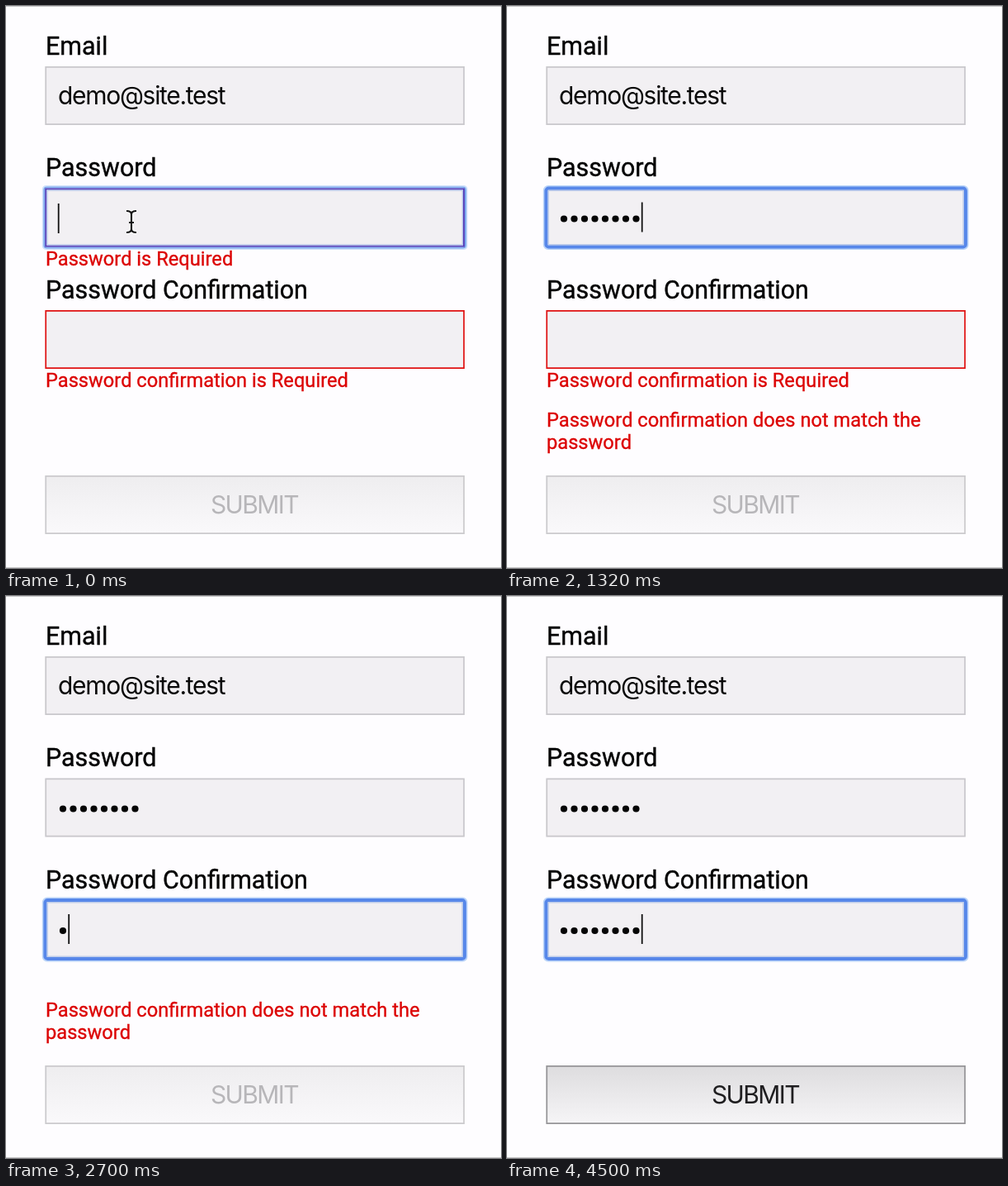
An HTML page with a canvas for the animation above (4.68 s loop, 600 by 680 pixels).

```html
<!DOCTYPE html>
<html lang="en">
<head>
<meta charset="utf-8">
<title>Password form</title>
<style>
html, body { margin: 0; width: 100%; height: 100%; overflow: hidden; background: #fefdff; }
canvas { display: block; }
</style>
</head>
<body>
<canvas id="stage" width="600" height="680"></canvas>
<script>
const ctx = document.getElementById('stage').getContext('2d');
const LOOP = 4680;
const BLINK = 270;
const TEXT_X = 48;
const LEFT = 47.4, WIDTH = 508.5, HEIGHT = 71;
const LABEL = '30.45px Roboto, sans-serif';
const ERROR = '23.67px Roboto, sans-serif';
const CONTROL = '30px Inter, sans-serif';

// Timed input: first field, tab to the second, one extra key, then backspace.
const FOCUS_CONFIRM = 1920;
const passwordKeys = Array.from({ length: 8 }, (_, i) => 540 + i * 100);
const confirmKeys = Array.from({ length: 7 }, (_, i) => 2640 + i * 90).concat(3600, 3720);
const BACKSPACE = 4260;
const carets = [-30, ...passwordKeys, FOCUS_CONFIRM, ...confirmKeys, BACKSPACE];

const countBefore = (times, t) => times.filter(k => k <= t).length;

function text(str, x, y, font, color, { spacing = 0, align = 'left', bolder = 0 } = {}) {
  ctx.font = font;
  ctx.fillStyle = ctx.strokeStyle = color;
  ctx.textAlign = align;
  ctx.letterSpacing = spacing + 'px';
  ctx.fillText(str, x, y);
  if (bolder) {
    ctx.lineWidth = bolder;
    ctx.strokeText(str, x, y);
  }
}

const label = (str, y) => text(str, TEXT_X, y, LABEL, '#040404', { bolder: 0.4 });
const error = (str, y) => text(str, TEXT_X, y, ERROR, '#dc0404', { bolder: 0.35 });

function frameField(y, color, width, inset, radius = 0) {
  ctx.strokeStyle = color;
  ctx.lineWidth = width;
  ctx.beginPath();
  ctx.roundRect(LEFT + inset, y + inset, WIDTH - 2 * inset, HEIGHT - 2 * inset, radius);
  ctx.stroke();
}

function field(y, { focused = false, invalid = false } = {}) {
  ctx.fillStyle = '#f2f0f3';
  ctx.fillRect(LEFT, y, WIDTH, HEIGHT);
  if (!focused) {
    frameField(y, invalid ? '#e01212' : '#c9c8cc', 1.7, 0.85);
  } else if (invalid) {
    frameField(y, '#cfe1fb', 1.8, -2.7, 4);
    frameField(y, '#7da9ee', 2.2, -1, 3);
    frameField(y, '#5640ba', 2, 0.9);
    frameField(y, '#bac8ea', 1.4, 2.5);
  } else {
    frameField(y, '#b9d3f8', 2.2, -2.5, 5);
    frameField(y, '#5787e9', 4.2, 0.1, 3);
    frameField(y, '#bccbea', 1.4, 2.8);
  }
}

function dots(count, y) {
  ctx.fillStyle = '#050505';
  for (let i = 0; i < count; i++) {
    ctx.beginPath();
    ctx.arc(69 + i * 12.5, y, 4.1, 0, Math.PI * 2);
    ctx.fill();
  }
}

function caret(count, y) {
  ctx.fillStyle = '#111';
  ctx.fillRect(62.8 + count * 12.5, y, 1.8, 36);
}

function pointer(x, y) {
  const beam = new Path2D();
  for (const s of [-1, 1]) {
    beam.moveTo(x - 6, y + s * 13);
    beam.quadraticCurveTo(x, y + s * 13, x, y + s * 9);
    beam.quadraticCurveTo(x, y + s * 13, x + 6, y + s * 13);
  }
  beam.moveTo(x, y - 10);
  beam.lineTo(x, y + 10);
  beam.moveTo(x - 3, y + 1);
  beam.lineTo(x + 3, y + 1);
  for (const [color, width] of [['#fff', 4.5], ['#151515', 2.2]]) {
    ctx.strokeStyle = color;
    ctx.lineWidth = width;
    ctx.stroke(beam);
  }
}

function submit(enabled) {
  const fill = ctx.createLinearGradient(0, 568, 0, 639);
  fill.addColorStop(0, enabled ? '#dddcde' : '#eeedef');
  fill.addColorStop(1, enabled ? '#f6f5f7' : '#faf9fb');
  ctx.fillStyle = fill;
  ctx.fillRect(LEFT, 568, WIDTH, HEIGHT);
  frameField(568, enabled ? '#969598' : '#cbcacd', 1.7, 0.85);
  text('SUBMIT', 301, 614, CONTROL, enabled ? '#1f1e20' : '#b7b6b9', { spacing: -1.6, align: 'center' });
}

function draw(t) {
  const typed = countBefore(passwordKeys, t);
  const confirmed = countBefore(confirmKeys, t) - (t >= BACKSPACE ? 1 : 0);
  const onConfirm = t >= FOCUS_CONFIRM;
  const lastInput = carets[countBefore(carets, t) - 1];
  const caretOn = Math.floor((t - lastInput) / BLINK) % 2 === 0;

  ctx.fillStyle = '#fefdff';
  ctx.fillRect(0, 0, 600, 680);
  ctx.fillStyle = '#c8c7c9';
  ctx.fillRect(0, 0, 600, 1);
  ctx.fillRect(0, 679, 600, 1);

  label('Email', 59);
  label('Password', 206);
  label('Password Confirmation', 354);

  field(73);
  text('demo@site.test', 63, 118.5, CONTROL, '#080808', { spacing: -1.3 });
  field(220.5, { focused: !onConfirm, invalid: !typed });
  field(368, { focused: onConfirm, invalid: !confirmed });
  dots(typed, 257.5);
  dots(confirmed, 405);
  if (caretOn) {
    if (onConfirm) caret(confirmed, 385);
    else caret(typed, typed ? 237.5 : 239);
  }

  if (!typed) {
    error('Password is Required', 314);
    pointer(152, 261);
  }
  if (!confirmed) error('Password confirmation is Required', 461);
  if (typed && typed !== confirmed) {
    error('Password confirmation does not match the', 509);
    error('password', 536);
  }
  submit(typed > 0 && typed === confirmed);
}

let start;
function tick(now) {
  start ??= now;
  draw((now - start) % LOOP);
  requestAnimationFrame(tick);
}
draw(0);
requestAnimationFrame(tick);
</script>
</body>
</html>
```
